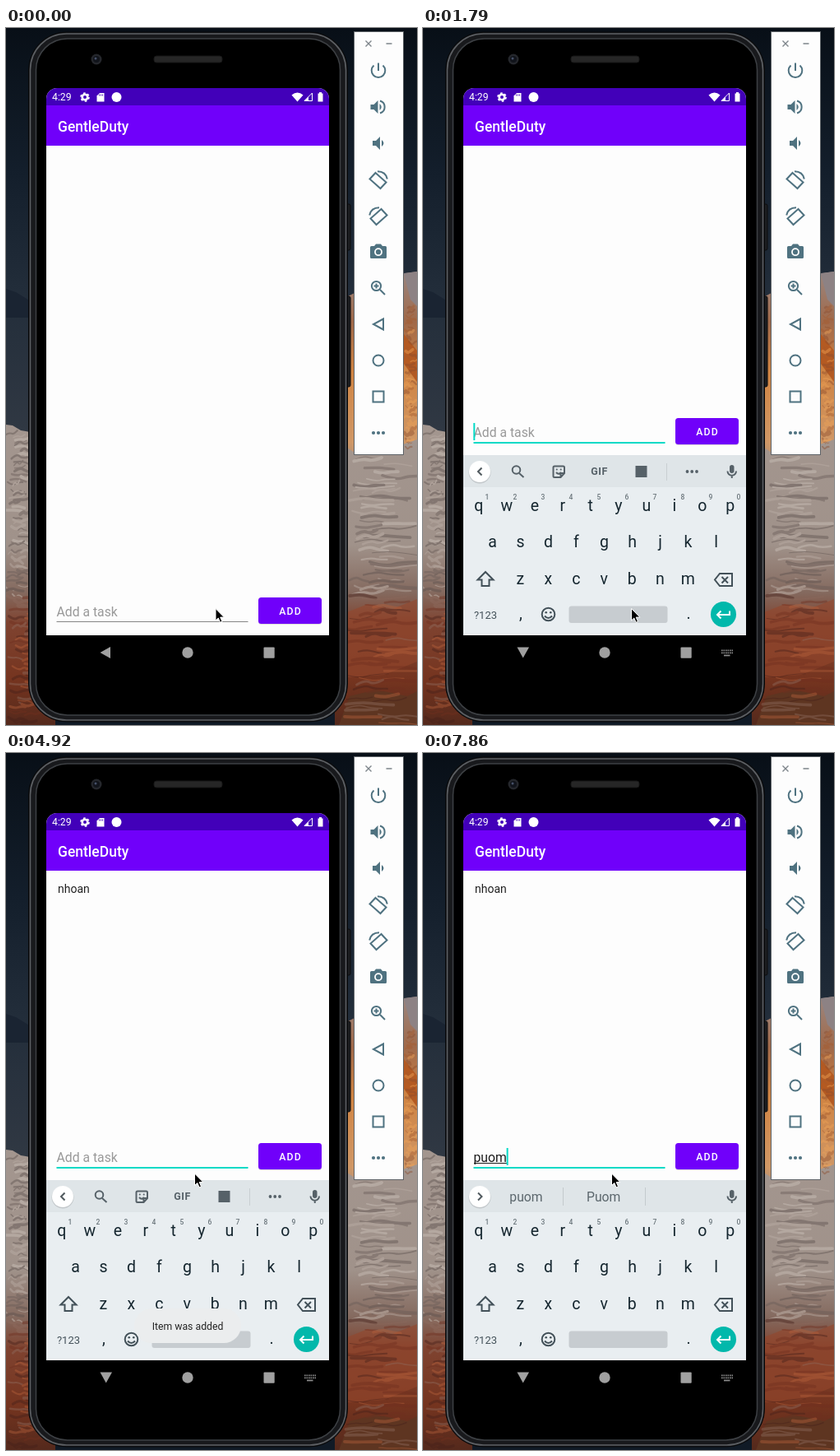
Animation, 500 px wide and 847 px high, one loop 8 s. Source, as an HTML page:

```html
<!DOCTYPE html>
<html lang="en">
<head>
<meta charset="utf-8">
<title>Task list demo</title>
<style>
html, body { margin: 0; width: 100%; height: 100%; overflow: hidden; background: #101a26; }
svg { display: block; width: 500px; height: 847px; }
text { font-family: Roboto, "Open Sans", sans-serif; }
.mid { text-anchor: middle; }
.line { fill: none; stroke-width: 2; }
#tools { fill: #4f7280; stroke: #4f7280; }
#tools .fill, #strip .fill { stroke: none; }
#keys text { fill: #15262f; font-size: 19.5px; }
#keys .num { fill: #6b767c; font-size: 8.5px; font-weight: 500; }
#strip { fill: #566168; stroke: #566168; }
#strip text, #words text { stroke: none; }
#words text { fill: #5c676d; font-size: 15.75px; }
#words .bold { fill: #0b0f12; font-weight: 700; }
</style>
</head>
<body>
<svg viewBox="0 0 500 847" xmlns="http://www.w3.org/2000/svg">
<defs>
  <linearGradient id="sky" x2="0" y2="1">
    <stop offset="0" stop-color="#080f17"/><stop offset=".35" stop-color="#131e2b"/>
    <stop offset=".65" stop-color="#222d3a"/><stop offset="1" stop-color="#303843"/>
  </linearGradient>
  <linearGradient id="rock" gradientUnits="userSpaceOnUse" x1="0" y1="482" x2="0" y2="847">
    <stop offset="0" stop-color="#a3968f"/><stop offset=".4" stop-color="#a0928a"/>
    <stop offset=".56" stop-color="#84695e"/><stop offset=".66" stop-color="#7f4330"/>
    <stop offset=".85" stop-color="#75341f"/><stop offset="1" stop-color="#54291c"/>
  </linearGradient>
  <linearGradient id="cliff" x2="0" y2="1">
    <stop offset="0" stop-color="#9b8780"/><stop offset=".25" stop-color="#a0694a"/>
    <stop offset=".5" stop-color="#d08443"/><stop offset=".85" stop-color="#cf9766"/>
    <stop offset="1" stop-color="#a08a7f"/>
  </linearGradient>
  <clipPath id="screen"><path d="M49 738V86a13 13 0 0 1 13-13H380a13 13 0 0 1 13 13V738Z"/></clipPath>
  <clipPath id="btnClip"><rect x="307" y="474" width="77" height="32" rx="3.5"/></clipPath>
</defs>

<!-- landscape -->
<rect width="500" height="490" fill="url(#sky)"/>
<path d="M0 317L12 321 30 332V352H0Z" fill="#1a2432"/>
<path d="M0 482L8 483 18 489 30 491 60 560V847H0Z" fill="url(#rock)"/>
<path d="M400 334L424 322 470 304 486 298 500 296V540H400Z" fill="url(#cliff)"/>
<path d="M484 298L500 296V338L492 330Z" fill="#8d8284"/>
<path d="M484 372L500 392V430L484 408Z" fill="#b45a22"/>
<path d="M400 500L424 516 460 514 500 500V847H400Z" fill="url(#rock)"/>
<path d="M400 716L440 700 470 706 500 694V770L460 786 400 790Z" fill="#95472c" opacity=".6"/>
<path d="M405 847L418 812 450 804 488 812 500 806V847Z" fill="#5e3521"/>
<g id="strata" fill="none" opacity=".42" stroke-linecap="round"></g>

<!-- handset -->
<rect x="414" y="214" width="5" height="56" rx="2" fill="#1d1e21" stroke="#0c0c0e"/>
<rect x="414" y="326" width="5" height="110" rx="2" fill="#1d1e21" stroke="#0c0c0e"/>
<rect x="27.500" y="5" width="388" height="838" rx="46" fill="#18191c" stroke="#08090a"/>
<rect x="29.500" y="7" width="384" height="834" rx="44" fill="none" stroke="#5d6064" stroke-width="1.500"/>
<rect x="36.500" y="13" width="370" height="822" rx="38" fill="#000" stroke="#3d4044" stroke-width="1.500"/>
<circle cx="110" cy="38" r="6.500" fill="#25272c"/><circle cx="110" cy="38" r="4" fill="#11141b"/>
<circle cx="109" cy="37" r="1.500" fill="#465068"/>
<rect x="180" y="34" width="83" height="8" rx="3" fill="#262626" stroke="#171717"/>

<!-- app -->
<g clip-path="url(#screen)">
  <rect x="49" y="73" width="344" height="665" fill="#fdfdfd"/>
  <rect x="49" y="94" width="344" height="49" fill="#7000fa"/>
  <rect x="49" y="73" width="344" height="21" fill="#4200b9"/>
  <g fill="#fff">
    <text x="56" y="88" font-size="12.250">4:29</text>
    <circle cx="96" cy="84" r="3.300" fill="none" stroke="#fff" stroke-width="2.600"/>
    <circle cx="96" cy="84" r="5" fill="none" stroke="#fff" stroke-width="1.600" stroke-dasharray="2.600 2.636"/>
    <path d="M114 79H119.500V89.500H110.500V82.500Z"/>
    <path d="M113.500 80.500v2m2-2v2m2-2v2" stroke="#4200b9" stroke-width=".9"/>
    <circle cx="134.500" cy="84" r="6"/>
    <path d="M347.500 81.500Q354.500 75.500 361.500 81.500L354.500 89.500Z"/>
    <path d="M363 88.500L372.500 79V88.500Z" fill="none" stroke="#fff"/>
    <path d="M363 88.500L368 83.500V88.500Z"/>
    <path d="M379.500 79.500H381V78H384V79.500H385.500V89.500H379.500Z"/>
    <text x="63" y="125.500" font-size="17.500" font-weight="500">GentleDuty</text>
  </g>
  <text id="item" x="63" y="169.500" font-size="14" fill="#222">nhoan</text>

  <g id="form">
    <text id="hint" x="61.500" y="497" font-size="15.750" fill="#999">Add a task</text>
    <text id="typed" x="61.500" y="497" font-size="15.750" fill="#1c1c1c"></text>
    <rect id="under" x="62" y="498" height="1" fill="#1c1c1c"/>
    <rect id="base" x="61.500" width="233"/>
    <rect id="caret" y="480" width="2" height="21" fill="#04dac6"/>
    <rect x="307" y="475" width="77" height="32" rx="3.500" fill="#000" opacity=".13"/>
    <rect x="307" y="474" width="77" height="32" rx="3.500" fill="#7000fa"/>
    <circle id="ripple" cx="344" cy="485" fill="#fff" clip-path="url(#btnClip)"/>
    <text x="332.300" y="494.500" font-size="12.250" font-weight="500" letter-spacing="1.090" fill="#fff">ADD</text>
  </g>

  <g id="board">
    <rect x="49" y="519" width="344" height="219" fill="#e9eef1"/>
    <rect x="49" y="519" width="344" height="39" fill="#dfe5e8"/>
    <circle cx="69" cy="540" r="13.500" fill="#000" opacity=".13"/>
    <circle cx="69" cy="539" r="13" fill="#fff"/>
    <path id="chevron" class="line" stroke="#50595e" stroke-width="1.800"/>
    <g id="strip">
      <circle cx="113.500" cy="537" r="4.800" class="line" stroke-width="1.800"/>
      <path d="M117 541L122.500 546" class="line"/>
      <path d="M160 532.500H170.500Q172 532.500 172 534V541L167.500 546H160Q158.500 546 158.500 544.500V534Q158.500 532.500 160 532.500ZM172 541H167.500V546M162 540q3 3.500 6 0" class="line" stroke-width="1.500"/>
      <circle cx="162.800" cy="536.500" r="1" class="fill"/><circle cx="167.700" cy="536.500" r="1" class="fill"/>
      <text x="214.500" y="543" font-size="12.500" font-weight="700" letter-spacing=".5" class="mid">GIF</text>
      <rect x="258.500" y="532" width="14" height="14" class="fill"/>
      <path d="M296.500 529V550" stroke="#c8ced2"/>
      <circle cx="321.500" cy="539" r="1.900" class="fill"/><circle cx="327.200" cy="539" r="1.900" class="fill"/>
      <circle cx="333" cy="539" r="1.900" class="fill"/>
    </g>
    <g id="words">
      <path id="bars" d="M170.500 528V550M270.500 528V550" stroke="#c3cacd"/>
      <text class="mid" x="125.500" y="545"></text>
      <text class="mid" x="219.700" y="545"></text>
      <text class="mid" x="314" y="545"></text>
    </g>
    <rect x="373" y="531" width="5.500" height="10" rx="2.750" fill="#566168"/>
    <path d="M370.500 538.500a5.250 5.250 0 0 0 10.500 0M375.750 543.500V547" class="line" stroke="#566168" stroke-width="1.600"/>
    <g id="keys">
      <rect x="177.500" y="702.500" width="120" height="20.500" rx="3" fill="#c7ccd0"/>
    </g>
    <g class="line" stroke="#435159" stroke-width="1.600">
      <path d="M76 661L85.500 670.500H80.500V678H71.500V670.500H66.500Z"/>
      <path d="M361 663H376V678H361L355 670.500ZM363.500 667L371 674.500M371 667L363.500 674.500"/>
      <circle cx="152.500" cy="712.500" r="7.800"/>
      <path d="M148 714.500q4.500 5 9 0"/>
    </g>
    <circle cx="149.700" cy="710.300" r="1.300" fill="#435159"/><circle cx="155.300" cy="710.300" r="1.300" fill="#435159"/>
    <circle cx="365.500" cy="712.500" r="15.500" fill="#02b8ab"/>
    <path d="M373 708.500V713H358.500M362.500 708.500L358 713L362.500 717.500" class="line" stroke="#fff" stroke-width="1.900"/>
  </g>

  <g id="toast">
    <rect x="156" y="675" width="130" height="42" rx="21" fill="#ebedee"/>
    <text class="mid" x="221" y="700.500" font-size="12.250" fill="#252525">Item was added</text>
  </g>
</g>

<g fill="#a0a0a0">
  <path id="back"/>
  <circle cx="221" cy="759" r="6.700"/>
  <rect x="313.500" y="752.500" width="13.200" height="13.200" rx="1"/>
  <g id="ime" stroke="#8c8c8c" stroke-width="1.700" fill="none">
    <path d="M363 756.300H377M363 759.300H377" stroke-dasharray="1.600 .9"/>
    <path d="M366 762.500H373.500"/>
  </g>
</g>

<!-- side panel -->
<rect x="423.500" y="4.500" width="60" height="514" fill="#fdfdfd" stroke="#5f6468"/>
<path d="M437.500 15.500l7 7m0-7l-7 7M462.500 19h7" stroke="#7d858a" stroke-width="1.400"/>
<g id="tools">
  <path d="M453 42.500V52M447.500 45.500a8.300 8.300 0 1 0 11 0" class="line" stroke-width="2.200"/>
  <path d="M443.500 93h4l5-5v16l-5-5h-4ZM454.500 92q4.500 4 0 8Z" class="fill"/>
  <path d="M455 88.500a7.800 7.800 0 0 1 0 15" class="line"/>
  <path d="M446 137h4l5-5v16l-5-5h-4ZM457 136q5 4 0 8Z" class="fill"/>
  <g id="turn">
    <path d="M449.500 176L462.500 187.500 455.500 195 442.500 183.500Z" class="line" stroke-width="1.800"/>
    <path d="M452 174.300Q462 174.500 463.800 183.500" class="line" stroke-width="1.600"/>
  </g>
  <use href="#turn" transform="translate(906 44) scale(-1 1)"/>
  <path d="M450 262.500H456L458 265H461.500Q463 265 463 266.500V278.500Q463 280 461.500 280H444.500Q443 280 443 278.500V266.500Q443 265 444.500 265H448Z" class="fill"/>
  <circle cx="453" cy="272.200" r="4" fill="#4f7280" stroke="#fff" stroke-width="1.800"/>
  <circle cx="450.500" cy="313.500" r="5.600" class="line"/>
  <path d="M455 318L461 324" class="line" stroke-width="2.400"/>
  <path d="M447.500 313.500h6m-3-3v6" class="line" stroke-width="1.200"/>
  <path d="M459 353.500V366.500L447 360Z" class="line" stroke-width="1.800"/>
  <circle cx="453" cy="404" r="6.500" class="line" stroke-width="1.800"/>
  <rect x="446.500" y="441.500" width="13" height="13" class="line" stroke-width="1.800"/>
  <circle cx="447" cy="492" r="2.100" class="fill"/><circle cx="453" cy="492" r="2.100" class="fill"/>
  <circle cx="459" cy="492" r="2.100" class="fill"/>
</g>
<path id="mouse" d="M0 0V14.500L3.300 11.500 5.600 16.800 8 15.800 5.700 10.600H10.400Z" fill="#000" stroke="#fff" stroke-linejoin="round"/>
</svg>

<script>
const LOOP = 8000;
const $ = id => document.getElementById(id);
const NS = "http://www.w3.org/2000/svg";
const set = (el, attrs) => { for (const k in attrs) el.setAttribute(k, attrs[k]); };
const show = (el, on) => { el.style.visibility = on ? "visible" : "hidden"; };

function add(parent, tag, attrs, text) {
  const el = document.createElementNS(NS, tag);
  set(el, attrs);
  if (text) el.textContent = text;
  parent.append(el);
}

// rock layers on both sides
let seed = 11;
const rnd = () => (seed = seed * 16807 % 2147483647) / 2147483647;
function strata(x, width, top, bottom, colors) {
  for (let y = top; y < bottom; y += 2 + rnd() * 3) {
    const a = x + rnd() * width * .6, w = width * (.25 + rnd() * .4), bend = rnd() * 12 - 6;
    add($("strata"), "path", {
      d: `M${a} ${y}q${w / 3} ${bend} ${w / 2} ${bend / 2}t${w / 2} ${rnd() * 8 - 4}`,
      stroke: colors[Math.floor(rnd() * colors.length)], "stroke-width": 1 + rnd() * 3
    });
  }
}
const pale = ["#cfc5bd", "#685b57", "#bdb0a8", "#5a4f4c"];
const red = ["#b8623c", "#45201a", "#702f1f", "#8f6c5f"];
strata(0, 32, 494, 690, pale);
strata(0, 45, 690, 845, red);
strata(484, 16, 340, 510, ["#f0a458", "#a65a2c", "#8b4b2c"]);
strata(412, 88, 524, 690, pale);
strata(408, 92, 690, 845, red);

// keyboard letters
const keys = $("keys");
function row(chars, x, y) {
  [...chars].forEach((c, i) => add(keys, "text", { x: x + i * 34, y, class: "mid" }, c));
}
row("qwertyuiop", 67.8, 587);
row("asdfghjkl", 84.5, 631);
row("zxcvbnm", 118.3, 675.5);
[..."1234567890"].forEach((c, i) => add(keys, "text", { x: 78 + i * 34, y: 573, class: "num mid" }, c));
add(keys, "text", { x: 76, y: 717.5, class: "mid", style: "font-size:13px;fill:#435159" }, "?123");
add(keys, "text", { x: 119, y: 718, class: "mid" }, ",");
add(keys, "text", { x: 323, y: 718, class: "mid" }, ".");

// step tables: [start time, value...]
const MOUSE = [[0, 255, 705.5], [150, 253.5, 705.5], [3130, 257, 697], [3280, 280, 653],
  [3430, 336, 563], [3580, 384, 507], [3720, 370, 490], [3870, 349, 484], [4020, 343, 484],
  [4320, 341, 485], [4470, 312, 494], [4620, 262, 507], [4770, 233, 511], [4920, 229.5, 511]];
const CARET = [[0, 0], [600, 1], [1190, 0], [1790, 1], [3130, 0], [3720, 1], [4920, 0],
  [5370, 1], [5820, 0], [6110, 1]];
const SLIDE = [[0, 230], [890, 130], [1040, 30], [1190, 0]];
const TOAST = [[0, 0], [4170, .6], [4320, 1], [6400, .9], [6550, .65], [6690, 0]];
const RIPPLE = [[0, 0, 0], [4170, 26, .26], [4320, 60, .2], [4470, 60, .08], [4620, 0, 0]];
const TYPING = [[0, ""],
  [2080, "n", "n", "N", "no"], [2230, "nh", "nh", "NH", "night"], [2380, "nho", "nho", "Nho", "who"],
  [2530, "nhoa", "nhoa", "Nhoa", ""], [2680, "nhoan", "", "nhoan", ""], [4320, ""],
  [6110, "p", "p", "P", "PM"], [6400, "pg", "pg", "PG", "please"], [6840, "p", "p", "P", "PM"],
  [7130, "pu", "pu", "PU", "put"], [7280, "pu", "pu", "Pu", "put"],
  [7570, "puo", "puo", "Puo", "purchase"], [7710, "puom", "puom", "Puom", "purchase"],
  [7860, "puom", "puom", "Puom", ""]];

const at = (steps, t) => steps.findLast(s => s[0] <= t).slice(1);
const slots = [...document.querySelectorAll("#words text")];

function draw(t) {
  const [mx, my] = at(MOUSE, t);
  set($("mouse"), { transform: `translate(${mx} ${my})` });

  const [text, ...words] = at(TYPING, t);
  const typed = $("typed");
  typed.textContent = text;
  const w = text ? typed.getComputedTextLength() : 0;
  set($("under"), { width: w });
  set($("caret"), { x: 61.3 + w });
  show($("caret"), at(CARET, t)[0]);
  show($("hint"), !text);
  show($("strip"), !text);
  show($("words"), text);
  show($("bars"), words[0]);
  slots.forEach((el, i) => {
    el.textContent = words[i] || "";
    el.classList.toggle("bold", words[i] === "PG");
  });
  set($("chevron"), { d: text ? "M67 534.500L71.500 539L67 543.500" : "M71.500 534.500L67 539L71.500 543.500" });

  const focused = t >= 600, open = t >= 740;
  set($("form"), { transform: `translate(0 ${open ? 0 : 218})` });
  set($("base"), focused ? { y: 503, height: 2, fill: "#04dac6" } : { y: 503, height: 1, fill: "#858585" });
  set($("board"), { transform: `translate(0 ${at(SLIDE, t)[0]})` });
  show($("ime"), open);
  set($("back"), { d: t >= 890 ? "M114.500 752.500H129L121.700 765.500Z" : "M127 752V766L114.500 759Z" });

  const [r, glow] = at(RIPPLE, t);
  set($("ripple"), { r, opacity: glow });
  show($("item"), t >= 4320);
  set($("toast"), { opacity: at(TOAST, t)[0] });
}

const start = performance.now();
function tick() {
  draw((performance.now() - start) % LOOP);
  requestAnimationFrame(tick);
}
tick();
</script>
</body>
</html>
```
